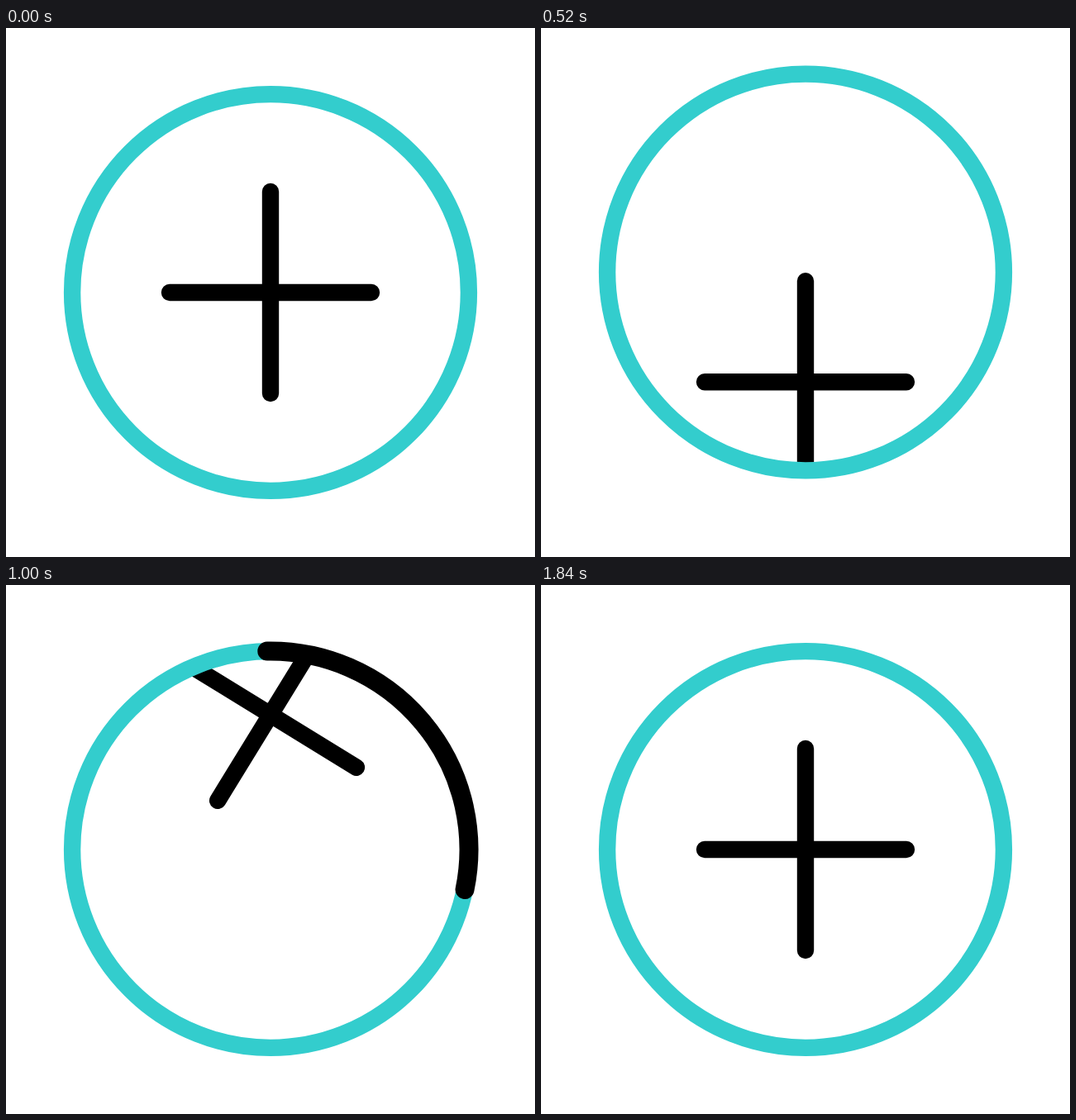
Write an HTML page that moves like this. It is 640x640 px and loops after 2 s.

```html
<!DOCTYPE html>
<html lang="en">
<head>
<meta charset="utf-8">
<title>Plus button</title>
<style>
  html, body { margin: 0; width: 100%; height: 100%; overflow: hidden; background: #fff; }
  svg { display: block; width: 100%; height: 100%; }
  path, .ring { fill: none; stroke: #000; stroke-linecap: round; }
  .ring { stroke: #33cdcd; stroke-width: 20.4; }
  #plus { stroke-width: 20.4; }
  #arc { stroke-width: 23; }
</style>
</head>
<body>
<svg viewBox="0 0 640 640">
  <clipPath id="inside"><circle id="hole" cx="320" cy="320" r="240"/></clipPath>
  <g clip-path="url(#inside)"><path id="plus" d="M-122 0H122M0 -122V122"/></g>
  <circle id="ring" class="ring" cx="320" cy="320" r="239.9"/>
  <path id="arc"/>
</svg>
<script>
const LOOP = 2000, STEP = 40, CENTER = 320, RADIUS = 240;

// [time in ms, value] pairs, eased in and out between neighbours
const tracks = {
  ringY: [[150, 0], [360, 33.3], [560, -31.2], [760, 0]],
  plusY: [[160, 0], [590, 116.5], [854, -232.6], [1257, 0]],
  plusTurn: [[590, 0], [854, 45], [1257, 0]],
  arcHead: [[761, 0], [1439, 360]],
  arcTail: [[1040, 0], [1840, 360]]
};

const ring = document.getElementById('ring');
const hole = document.getElementById('hole');
const plus = document.getElementById('plus');
const arc = document.getElementById('arc');

const ease = u => u * u * (3 - 2 * u);

function valueAt(keys, t) {
  if (t <= keys[0][0]) return keys[0][1];
  const i = keys.findIndex(([time]) => time > t);
  if (i < 0) return keys[keys.length - 1][1];
  const [t0, v0] = keys[i - 1], [t1, v1] = keys[i];
  return v0 + (v1 - v0) * ease((t - t0) / (t1 - t0));
}

function pointAt(degrees) {
  const a = (degrees - 91) * Math.PI / 180;
  return `${CENTER + RADIUS * Math.cos(a)} ${CENTER + RADIUS * Math.sin(a)}`;
}

function arcPath(tail, head) {
  if (head - tail < 0.01) return '';
  const large = head - tail > 180 ? 1 : 0;
  return `M${pointAt(tail)}A${RADIUS} ${RADIUS} 0 ${large} 1 ${pointAt(head)}`;
}

function draw(t) {
  const at = name => valueAt(tracks[name], t);
  const ringY = CENTER + at('ringY');
  ring.setAttribute('cy', ringY);
  hole.setAttribute('cy', ringY);
  plus.setAttribute('transform',
    `translate(${CENTER} ${CENTER + at('plusY')}) rotate(${at('plusTurn')})`);
  arc.setAttribute('d', arcPath(at('arcTail'), at('arcHead')));
}

const start = performance.now();
function tick() {
  const t = (performance.now() - start) % LOOP;
  draw(Math.floor(t / STEP) * STEP);
  requestAnimationFrame(tick);
}
tick();
</script>
</body>
</html>
```
